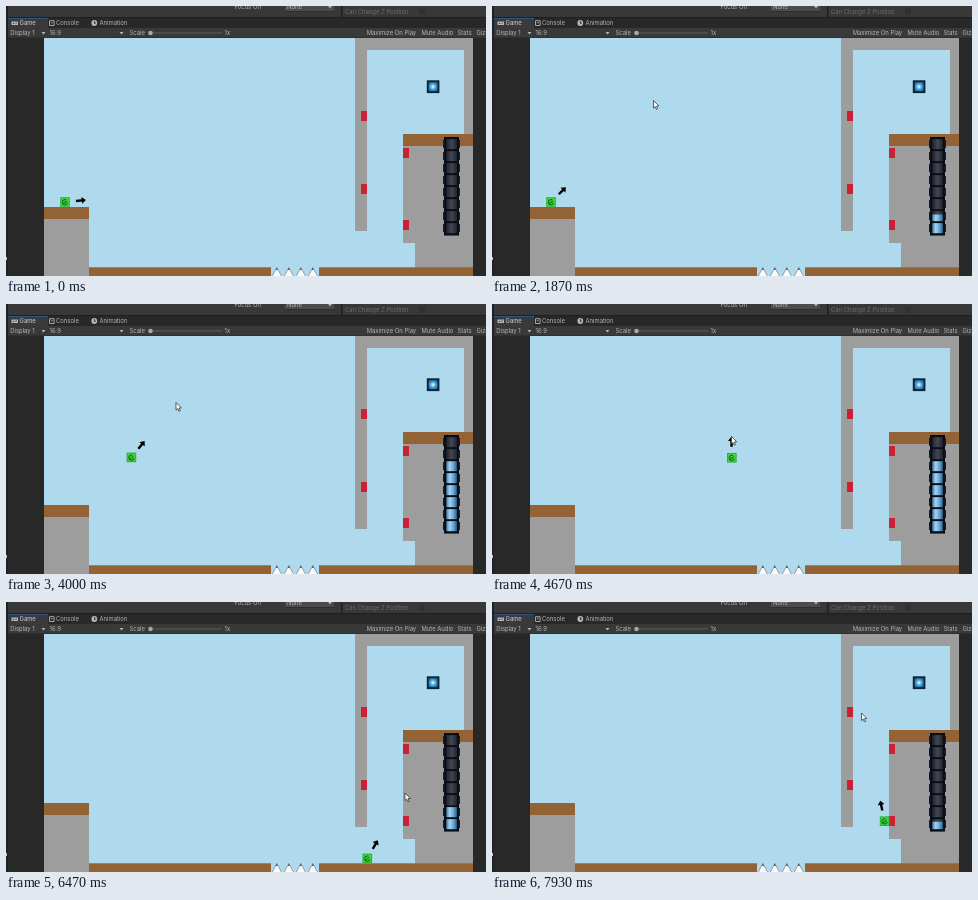
Recreate the animation shown at these times as an HTML page with a canvas. Size 480 px wide and 270 px high, loop 8 s.

```html
<!DOCTYPE html>
<html lang="en">
<head>
<meta charset="utf-8">
<title>Launch game</title>
<style>
html, body { margin: 0; width: 100%; height: 100%; overflow: hidden; background: #282828; }
canvas { display: block; width: 480px; height: 270px; }
</style>
</head>
<body>
<canvas id="stage" width="480" height="270"></canvas>
<script>
const ctx = document.getElementById('stage').getContext('2d');
const LOOP = 8000;
const SKY = '#afd9ed', WALL = '#9d9d9d', WOOD = '#946335', RED = '#cb2135';
const TEXT = '#b6b6b6';

const CELL = 12, CELLS = 8;   // power meter
const CHARGE_RATE = 0.0295;   // meter pixels per ms
const POWER = 27;             // launch speed per square root of charge
const GRAVITY = 208;
const FLOOR_Y = 256.4, WALL_X = 392.6;

const start = { x: 59, y: 196 };
const holds = [
  { press: 1210, release: 3612 },
  { press: 5640, release: 6750 },
  { press: 7650, release: LOOP }
];

const pointerStart = { x: 490, y: 154 };
const moves = [
  { from: 70, to: 760, x: 158, y: 97 },
  { from: 930, to: 1800, x: 161.5, y: 94.5 },
  { from: 1900, to: 2700, x: 167.5, y: 95.5 },
  { from: 2860, to: 2990, x: 170, y: 98.5 },
  { from: 4400, to: 5100, x: 378, y: 200 },
  { from: 5110, to: 5390, x: 353, y: 190 },
  { from: 5600, to: 6000, x: 399, y: 191 },
  { from: 7330, to: 7850, x: 369.5, y: 111 }
];

const smooth = u => u * u * (3 - 2 * u);
const clamp01 = u => Math.min(1, Math.max(0, u));

function pointerAt(t) {
  let { x, y } = pointerStart;
  for (const m of moves) {
    const k = smooth(clamp01((t - m.from) / (m.to - m.from)));
    x += (m.x - x) * k;
    y += (m.y - y) * k;
  }
  return { x, y };
}

const charge = (hold, t) => (Math.min(t, hold.release) - hold.press) * CHARGE_RATE;

function meterAt(t) {
  const hold = holds.filter(h => t >= h.press).pop();
  return hold ? charge(hold, t) : 0;
}

// Fly towards the pointer until the floor or the sticky wall is reached.
function fly(from, hold, seconds) {
  const aim = pointerAt(hold.release);
  const angle = Math.atan2(aim.y - from.y, aim.x - from.x);
  const speed = POWER * Math.sqrt(charge(hold, hold.release));
  const vx = speed * Math.cos(angle), vy = speed * Math.sin(angle);
  const fallTime = (-vy + Math.sqrt(vy * vy + 2 * GRAVITY * (FLOOR_Y - from.y))) / GRAVITY;
  const s = Math.min(seconds, fallTime, (WALL_X - from.x) / vx);
  return { x: from.x + vx * s, y: from.y + vy * s + GRAVITY / 2 * s * s };
}

function playerAt(t) {
  return holds.filter(h => t >= h.release)
    .reduce((pos, h) => fly(pos, h, (t - h.release) / 1000), start);
}

function rect(color, x, y, w, h) {
  ctx.fillStyle = color;
  ctx.fillRect(x, y, w, h);
}

function poly(color, points) {
  ctx.fillStyle = color;
  ctx.beginPath();
  points.forEach(([x, y]) => ctx.lineTo(x, y));
  ctx.closePath();
  ctx.fill();
}

function outline(color, width) {
  ctx.strokeStyle = color;
  ctx.lineWidth = width;
  ctx.stroke();
}

function dot(color, x, y, r) {
  ctx.fillStyle = color;
  ctx.beginPath();
  ctx.arc(x, y, r, 0, Math.PI * 2);
  ctx.fill();
}

function text(str, x, y, color = TEXT) {
  ctx.font = '5.9px Inter, sans-serif';
  ctx.fillStyle = color;
  ctx.fillText(str, x, y);
}

function caret(x, y) {
  poly(TEXT, [[x - 2, y], [x + 2, y], [x, y + 2.4]]);
}

function gradient(x0, x1, ...colors) {
  const g = ctx.createLinearGradient(x0, 0, x1, 0);
  colors.forEach((c, i) => g.addColorStop(i / (colors.length - 1), c));
  return g;
}

function drawInspector() {
  rect('#383838', 0, 0, 480, 11.5);
  rect('#202020', 335, 0, 1.5, 11.5);
  text('Focus On', 228.5, 2.6);
  rect('#4c4c4c', 279, 0, 49, 5.5);
  rect('#2a2a2a', 279, 5.2, 49, 0.8);
  text('None', 281, 2.6);
  caret(324, 0);
  text('Can Change Z Position', 339, 7.6, '#6b6b6b');
  rect('#313131', 413, 2.5, 6, 6);
}

function drawTabs() {
  rect('#1f1f1f', 0, 11, 480, 1);
  rect('#3a3a3a', 2, 12, 40, 10);
  rect('#2f5f8c', 2, 12, 40, 0.8);
  rect(TEXT, 5.5, 15.5, 6.5, 3.5);
  rect('#3a3a3a', 7, 17, 1.3, 1);
  rect('#3a3a3a', 9.5, 16.5, 1.3, 1);
  text('Game', 13.5, 19.3, '#d2d2d2');
  ctx.beginPath();
  ctx.rect(43.5, 14.7, 4.6, 4.8);
  outline(TEXT, 0.9);
  rect(TEXT, 44.8, 16.4, 2, 0.8);
  text('Console', 50, 19.3);
  dot(TEXT, 88.3, 17, 2.9);
  rect('#282828', 88, 15, 0.8, 2.4);
  rect('#282828', 88, 16.7, 2, 0.8);
  text('Animation', 93.5, 19.3);
}

function drawToolbar() {
  rect('#393939', 2, 22, 478, 9.5);
  const labels = {
    'Display 1': 4.3, '16:9': 43.5, 'Scale': 123.5, '1x': 218.5,
    'Maximize On Play': 360.7, 'Mute Audio': 415.5, 'Stats': 451.5, 'Gizmos': 470.5
  };
  for (const [label, x] of Object.entries(labels)) text(label, x, 29);
  caret(37.5, 26);
  caret(115.5, 26);
  rect('#626262', 143, 26.5, 73, 0.9);
  dot('#a8a8a8', 144.5, 27, 2.3);
}

function drawEditor() {
  rect('#282828', 0, 0, 480, 270);
  drawInspector();
  drawTabs();
  drawToolbar();
  rect('#1b2229', 0, 0, 2, 270);
  rect('#c8c8c8', 0, 251, 1, 3);
}

function drawSpike(x) {
  poly('#fafafa', [[x + 0.8, 271], [x + 5.8, 261.5], [x + 11, 271]]);
  outline('#71828b', 0.7);
  poly('#3f484e', [[x + 4.9, 264], [x + 5.8, 261.3], [x + 6.8, 264]]);
}

function drawLevel() {
  rect(SKY, 38, 32, 429, 238);

  // Shaft on the right
  rect(WALL, 349, 32, 118, 12);
  rect(WALL, 349, 32, 12, 193);
  rect(WALL, 458, 32, 9, 97);
  rect(WALL, 397, 140, 70, 97);
  rect(WALL, 409, 237, 58, 25);
  rect(WOOD, 397, 128, 70, 12);
  for (const i of [0, 1]) {
    rect(RED, 355, 105 + i * 73, 6, 10);
    rect(RED, 397, 142 + i * 72, 6, 10);
  }

  // Left ledge and floor
  rect(WALL, 38, 213, 45, 57);
  rect(WOOD, 38, 201, 45, 12);
  rect(WOOD, 83, 261.3, 182, 9);
  rect(WOOD, 313, 261.3, 154, 9);
  for (let i = 0; i < 4; i++) drawSpike(265 + i * 12);

  // Portal
  rect('#0d2238', 420.8, 74.3, 12.6, 12.8);
  const glow = ctx.createRadialGradient(427, 80.7, 0.5, 427, 80.7, 6);
  glow.addColorStop(0, '#c9f1ff');
  glow.addColorStop(0.4, '#4aa6dd');
  glow.addColorStop(1, '#174f83');
  rect(glow, 422.6, 76.2, 9, 9);
}

function drawMeter(fill) {
  const top = 132, bottom = top + CELL * CELLS;
  const empty = gradient(440, 451, '#1d222c', '#414651', '#20242d');
  const lit = gradient(440, 451, '#3a729c', '#a3d3f2', '#6aa9d4', '#2a5c86');
  rect('#080d16', 438, top - 1, 15, CELL * CELLS + 2.5);
  rect(empty, 440.3, top, 10.6, CELL * CELLS);
  rect(lit, 440.3, bottom - fill, 10.6, fill);
  for (let i = 0; i <= CELLS; i++) rect('#080d16', 438, top + i * CELL - 0.8, 15, 1.9);
  for (let i = 0; i < CELLS; i++) {
    rect('#141e2e', 437, top + i * CELL + 2, 1.4, 8);
    rect('#141e2e', 452.6, top + i * CELL + 2, 1.4, 8);
  }
}

function drawPlayer({ x, y }) {
  rect('#25b32a', x - 4.8, y - 4.8, 9.6, 9.6);
  rect('#40d63b', x - 3.9, y - 3.9, 7.8, 7.8);
  ctx.beginPath();
  ctx.arc(x, y + 0.2, 2.6, 0.2, 5.2);
  ctx.moveTo(x - 1.5, y + 1.5);
  ctx.lineTo(x + 2, y - 1);
  outline('#177020', 1.1);
}

function drawArrow({ x, y }, aim) {
  ctx.save();
  ctx.translate(x, y);
  ctx.rotate(Math.atan2(aim.y - y, aim.x - x));
  ctx.translate(16, 0);
  poly('#000', [[-5, -1.2], [0.8, -1.2], [0.8, -3.5], [5, 0], [0.8, 3.5], [0.8, 1.2], [-5, 1.2]]);
  ctx.restore();
}

function drawPointer({ x, y }) {
  ctx.save();
  ctx.translate(x, y);
  poly('#fff', [[0, 0], [0, 7.6], [1.7, 6.1], [2.9, 8.8], [4.2, 8.2], [3, 5.6], [5.3, 5.4]]);
  outline('#222', 0.7);
  ctx.restore();
}

function frame(now) {
  const t = now % LOOP;
  const player = playerAt(t), pointer = pointerAt(t);
  drawEditor();
  drawLevel();
  drawMeter(meterAt(t));
  drawPlayer(player);
  drawArrow(player, pointer);
  drawPointer(pointer);
  requestAnimationFrame(frame);
}
requestAnimationFrame(frame);
</script>
</body>
</html>
```
